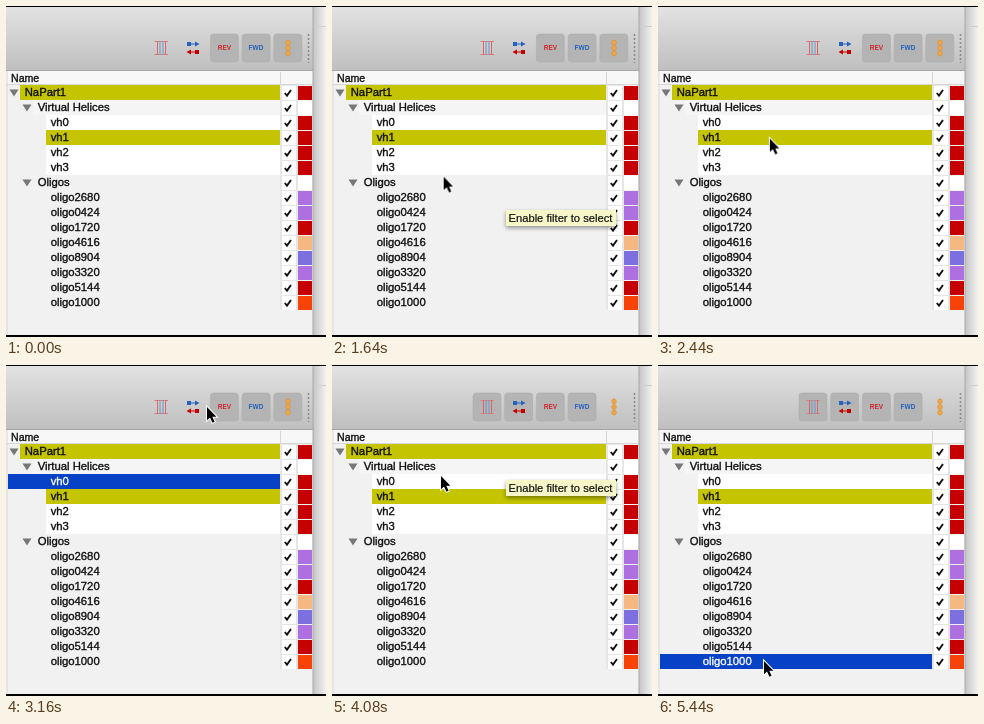
These frames come from a looping animation (320x331 px, 5.84 s). An HTML page:

```html
<!DOCTYPE html>
<html lang="en">
<head>
<meta charset="utf-8">
<title>Part outliner</title>
<style>
  html, body { margin: 0; width: 100%; height: 100%; overflow: hidden; background: #f1f1f1; }
  svg { display: block; width: 320px; height: 331px; }
  text { font: 11.3px "Liberation Sans", Arial, sans-serif; fill: #111; stroke: #111; stroke-width: .35px; }
  .tag { font-size: 6.5px; font-weight: bold; text-anchor: middle; stroke: none; }

  .pick, .state, #cursor, .tip { animation: 5840ms linear infinite both; }
  .pick, .state { animation-timing-function: step-end; }
  .pick { fill: #0741c6; }
  .pick text { fill: #fff; stroke: #fff; }
  .tip { filter: drop-shadow(0 2px 2px #0006); }
  .tip text { stroke-width: .2px; }

  @keyframes vh3 { 0%, 38.36% { opacity: 0 } 29.45% { opacity: 1 } }
  @keyframes vh2 { 0%, 41.1% { opacity: 0 } 38.36% { opacity: 1 } }
  @keyframes vh0 { 0%, 56.16% { opacity: 0 } 43.84% { opacity: 1 } }
  @keyframes oligo0424 { 0%, 84.93% { opacity: 0 } 79.45% { opacity: 1 } }
  @keyframes oligo4616 { 0%, 89.04% { opacity: 0 } 84.93% { opacity: 1 } }
  @keyframes oligo1000 { 0% { opacity: 0 } 89.04%, 100% { opacity: 1 } }

  /* Toolbar filters swap after the click */
  @keyframes turnOn { 0% { opacity: 0 } 56.16%, 100% { opacity: 1 } }
  @keyframes turnOff { 0% { opacity: 1 } 56.16%, 100% { opacity: 0 } }

  #tipA { animation-name: tipA; }
  #tipB { animation-name: tipB; }
  #tipC { animation-name: tipC; }
  @keyframes tipA {
    0%, 25.33% { opacity: 0 }
    25.34%, 31.5% { opacity: 1 }
    34.4%, 100% { opacity: 0 }
  }
  @keyframes tipB {
    0%, 64.37% { opacity: 0 }
    64.38%, 73.28% { opacity: 1 }
    73.29%, 100% { opacity: 0 }
  }
  @keyframes tipC {
    0%, 73.28% { opacity: 0 }
    73.29%, 80.8% { opacity: 1 }
    83.5%, 100% { opacity: 0 }
  }

  #cursor { animation-name: move; animation-timing-function: ease-in-out; }
  @keyframes move {
    0%, 16.42% { transform: translate(108px, 262px); opacity: 0 }
    16.44% { transform: translate(108px, 262px); opacity: 1 }
    20.55% { transform: translate(114px, 239px) }
    22.26% { transform: translate(115px, 262px) }
    24.66%, 26.03% { transform: translate(112px, 188px) }
    29.45%, 33.56% { transform: translate(110px, 161px) }
    38.36% { transform: translate(110px, 150px) }
    41.1% { transform: translate(111px, 134px) }
    43.84%, 47.95% { transform: translate(110px, 116px) }
    54.11% { transform: translate(200px, 41px) }
    55.48%, 58.22% { transform: translate(190px, 45px) }
    64.04% { transform: translate(110px, 103px) }
    69.86% { transform: translate(108px, 110px) }
    72.6%, 74% { transform: translate(109px, 130px) }
    77.4% { transform: translate(112px, 212px) }
    79.45%, 82.19% { transform: translate(109px, 208px) }
    84.93%, 86% { transform: translate(109px, 236px) }
    88.36% { transform: translate(106px, 282px) }
    89.73%, 100% { transform: translate(105px, 295px); opacity: 1 }
  }
</style>
</head>
<body>
<svg viewBox="0 0 320 331">
  <defs>
    <linearGradient id="bar" x2="0" y2="1">
      <stop stop-color="#e3e3e3"/><stop offset="1" stop-color="#bfbfbf"/>
    </linearGradient>
    <linearGradient id="edge">
      <stop stop-color="#c4c4c4"/><stop offset="1" stop-color="#f2f2f2"/>
    </linearGradient>
  </defs>
  <rect width="320" height="331" fill="#f1f1f1"/>
  <rect width="307" height="64" fill="url(#bar)"/>
  <rect y="64" width="307" height="1" fill="#a6a6a6"/>
  <rect y="65" width="307" height="14" fill="#f7f7f7"/>
  <path d="M0 78.5H307M274.5 66V78" stroke="#d6d6d6"/>
  <path d="M1 65V329" stroke="#d8d8d8"/>
  <text x="5" y="76" style="font-size:10.6px">Name</text>
  <g id="tools"></g>
  <path d="M302.5 28V57" stroke="#8c8c8c" stroke-width="1.6" stroke-dasharray="2 2"/>
  <g id="rows"></g>
  <rect x="307" width="13" height="331" fill="url(#edge)"/>
  <rect x="307" y="20" width="13" height="1" fill="#d0d0d0"/>
  <rect x="306.5" width="1" height="331" fill="#a8a8a8"/>
  <rect width="320" height="1"/>
  <rect y="329" width="320" height="2"/>
  <g id="tips"></g>
  <path id="cursor" d="M1 1V14.3L4 11.5L6.4 16.8L8.6 15.8L6.3 10.7H10.4Z"
        stroke="#fff" stroke-width="2" paint-order="stroke"/>
</svg>
<script>
  const red = '#c60000', violet = '#ae70e0', olive = '#c4c400', white = '#fff';
  const rect = (x, y, w, h, fill, more = '') =>
    `<rect x="${x}" y="${y}" width="${w}" height="${h}" fill="${fill}" ${more}/>`;
  const put = (id, html) => document.getElementById(id).innerHTML = html;

  // label, depth, swatch, row fill
  const rows = [
    ['NaPart1', 0, red, olive],
    ['Virtual Helices', 1, white, '#f5f5f5'],
    ['vh0', 2, red, white],
    ['vh1', 2, red, olive],
    ['vh2', 2, red, white],
    ['vh3', 2, red, white],
    ['Oligos', 1, white],
    ['oligo2680', 2, violet],
    ['oligo0424', 2, violet],
    ['oligo1720', 2, red],
    ['oligo4616', 2, '#f4b880'],
    ['oligo8904', 2, '#7c70e0'],
    ['oligo3320', 2, violet],
    ['oligo5144', 2, red],
    ['oligo1000', 2, '#f74308']
  ];
  const picked = ['vh0', 'vh2', 'vh3', 'oligo0424', 'oligo4616', 'oligo1000'];

  function row([label, depth, swatch, fill = '#f1f1f1'], i) {
    const y = 79 + 15 * i;
    const left = 14 + 13 * depth;
    const text = `<text x="${18.7 + 13 * depth}" y="${y + 11}">${label}</text>`;
    const arrow = depth < 2
      ? `<path d="M${left - 10.5} ${y + 4.5}h9l-4.5 7z" fill="#777"/>` : '';
    const pick = picked.includes(label)
      ? `<g class="pick" style="animation-name:${label}"><rect x="2" y="${y}" width="272" height="15"/>${text}</g>` : '';
    return rect(left, y, 274 - left, 15, fill) + arrow + text + pick
      + rect(274, y, 18, 15, '#e6e6e6') + rect(276, y + 1, 14, 14, white)
      + `<path d="M278.8 ${y + 8}l2.2 2.6 4-5.6" fill="none" stroke="#111" stroke-width="1.9"/>`
      + rect(292, y + 1, 14, 14, swatch);
  }
  put('rows', rows.map(row).join(''));

  const tag = (x, word, fill) => `<text class="tag" x="${x}" y="44" style="fill:${fill}">${word}</text>`;
  const blue = '#2462bd', orange = '#eda748';
  const icons = [
    `<path d="M148.5 35.5H162M148.5 48.5H162" stroke="#d98080"/>
     <path d="M151.5 35V49M159.5 35V49" stroke="#d66"/>
     <path d="M154 35V49M157 35V49" stroke="#7196c8"/>`,
    rect(181, 36, 4, 4, blue) + rect(189, 44, 4, 4, red)
      + `<path d="M185 37.5h4v-2l4.5 2.5-4.5 2.5v-2h-4z" fill="${blue}"/>
         <path d="M189 45.5h-4v-2l-4.5 2.5 4.5 2.5v-2h4z" fill="${red}"/>`,
    tag(218.5, 'REV', '#d1262b'),
    tag(250, 'FWD', blue),
    `<path d="M282 33V51" stroke="${orange}"/>`
      + [36.5, 42, 47.5].map(y => `<circle cx="282" cy="${y}" r="2.4" fill="${orange}" stroke="#d18a30" stroke-width=".5"/>`).join('')
  ];
  const states = ['turnOn', 'turnOn', 'none', 'none', 'turnOff'];
  put('tools', icons.map((icon, i) =>
    rect(141 + 31.7 * i, 28, 28, 28, '#b4b4b5',
      `rx="3" stroke="#aaa" stroke-width=".5" class="state" style="animation-name:${states[i]}"`) + icon
  ).join(''));

  const tip = (id, y) => `<g class="tip" id="${id}">
    ${rect(174, y, 110, 16, '#f6f6c9')}
    <text x="176.5" y="${y + 12}" style="font-size:11.2px">Enable filter to select</text></g>`;
  put('tips', tip('tipA', 204) + tip('tipB', 115) + tip('tipC', 145));
</script>
</body>
</html>
```
